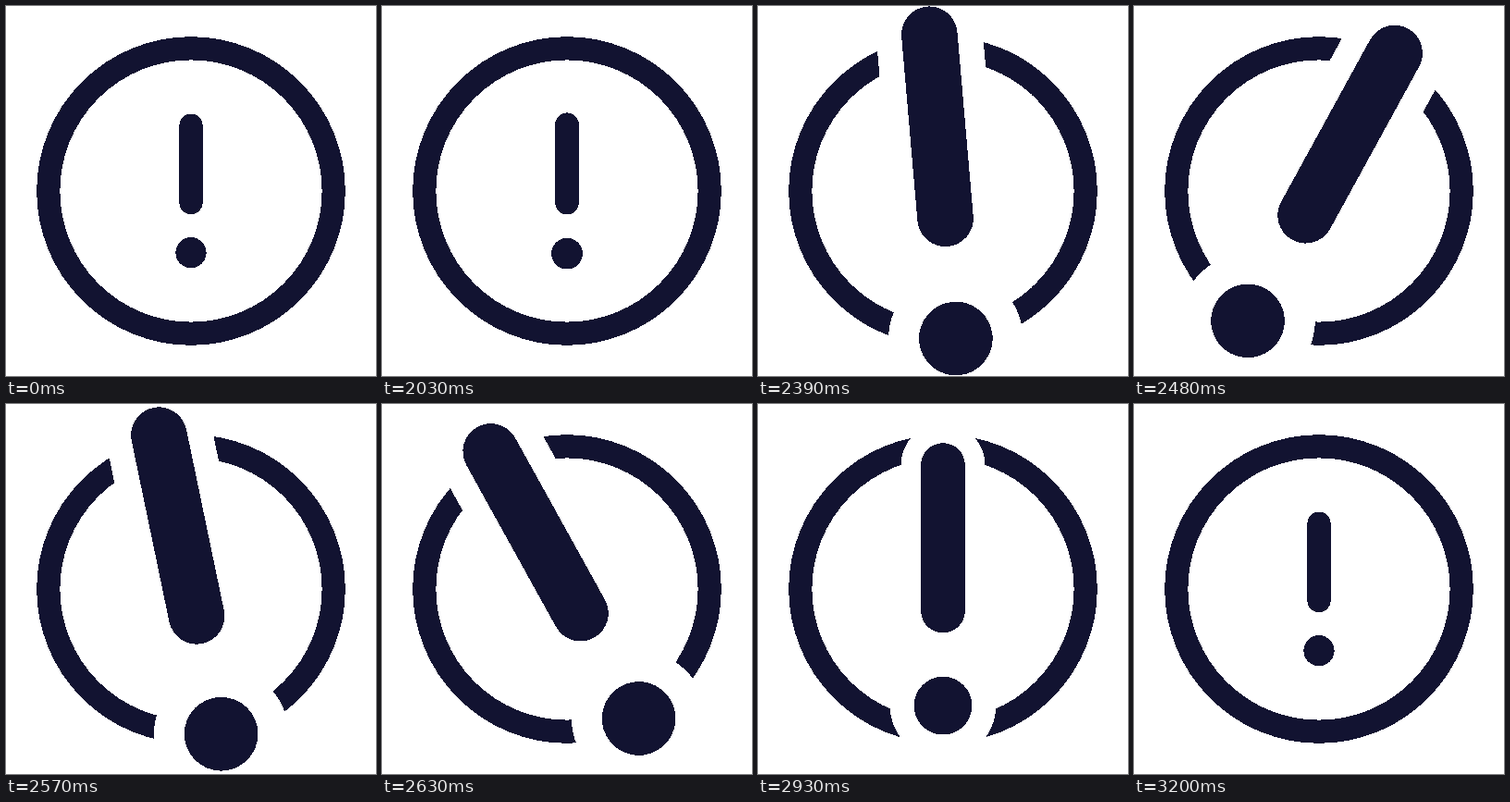
An HTML page for the animation above (3.23 s loop, 400x400 px).

```html
<!DOCTYPE html>
<html lang="en">
<head>
<meta charset="utf-8">
<title>Alert icon</title>
<style>
  html, body { margin: 0; width: 100%; height: 100%; overflow: hidden; background: #fff; }
  svg { display: block; width: 100%; height: 100%; shape-rendering: crispEdges; }
  .ink { fill: #121331; }
  .line { fill: none; stroke: #121331; stroke-width: 25.2; stroke-linecap: round; }
  .gap { fill: #fff; }
  .gap-line { fill: none; stroke: #fff; stroke-width: 48; stroke-linecap: round; }
</style>
</head>
<body>
<svg viewBox="0 0 400 400">
  <circle class="line" cx="200" cy="200" r="154.2"/>
  <g id="mark">
    <path class="gap-line" d="M0-70.8V12.5"/>
    <circle class="gap" cy="66.7" r="30.3"/>
    <path class="line" d="M0-70.8V12.5"/>
    <circle class="ink" cy="66.7" r="16.6"/>
  </g>
</svg>
<script>
const LOOP = 3230, TICK = 30, REST = 2030;
const mark = document.getElementById('mark');

// [time in ms, value]
const scaleKeys = [[2013, 1], [2297, 2.4], [2742, 2.4], [3203, 1]];
const angleKeys = [[2253, 0], [2324, -29.1], [2473, 29.1], [2625, -29.1], [2770, 0]];

const ease = p => p * p * (3 - 2 * p);

function valueAt(keys, t) {
  if (t <= keys[0][0]) return keys[0][1];
  for (let i = 1; i < keys.length; i++) {
    const [t0, a] = keys[i - 1], [t1, b] = keys[i];
    if (t < t1) return a + (b - a) * ease((t - t0) / (t1 - t0));
  }
  return keys[keys.length - 1][1];
}

function draw(now) {
  const t = now % LOOP;
  // The mark rests, then moves in even ticks
  const step = t < REST ? 0 : REST + Math.floor((t - REST) / TICK) * TICK;
  const angle = valueAt(angleKeys, step), scale = valueAt(scaleKeys, step);
  mark.setAttribute('transform', `translate(200 200) rotate(${angle}) scale(${scale})`);
}

let start;
function frame(now) {
  start ??= now;
  draw(now - start);
  requestAnimationFrame(frame);
}
draw(0);
requestAnimationFrame(frame);
</script>
</body>
</html>
```
